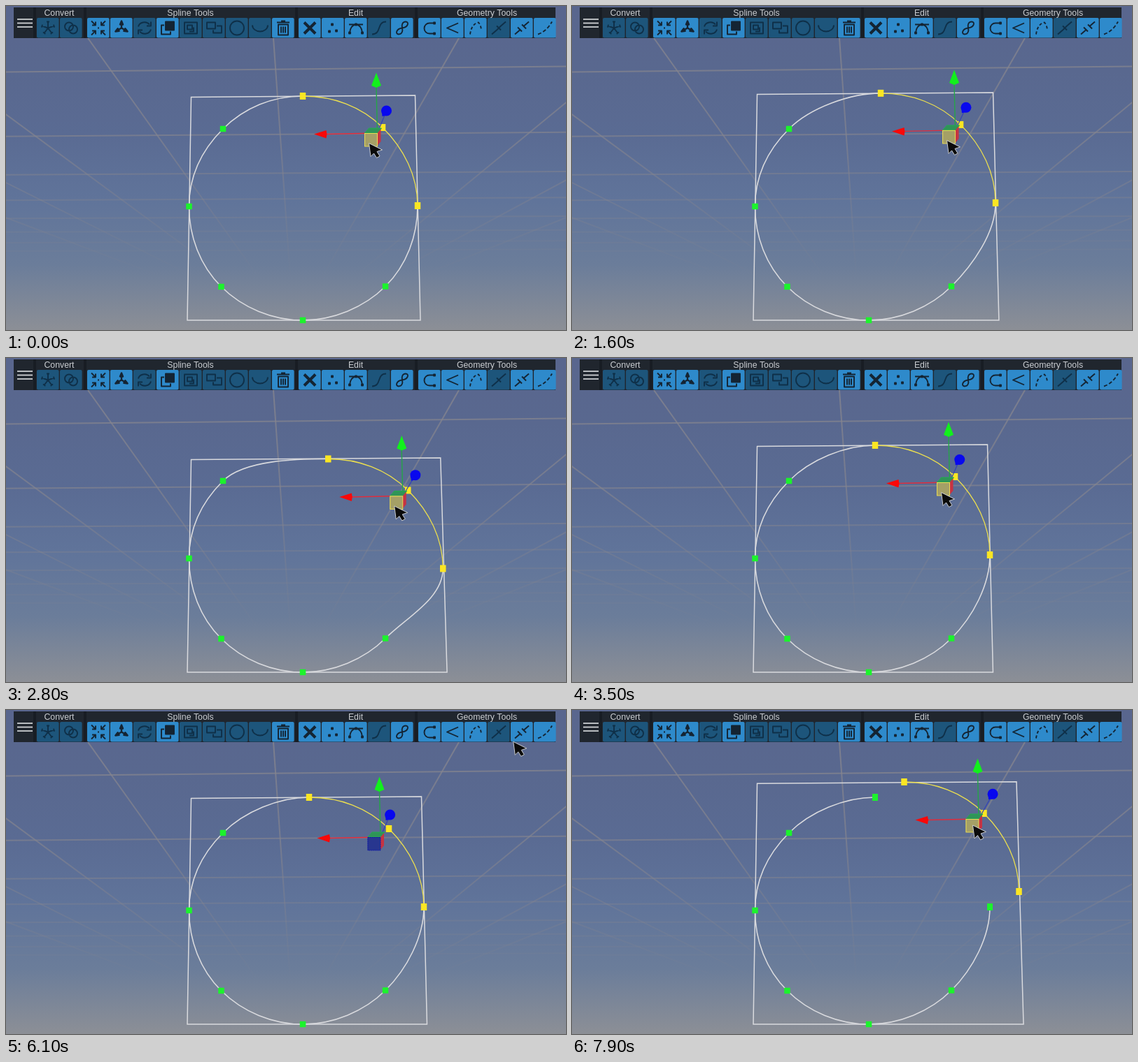
An HTML page with a canvas that plays this animation: 800 by 464 pixels, repeating every 8 s.

```html
<!DOCTYPE html>
<html>
<head>
<meta charset="utf-8">
<title>Spline editor</title>
<style>
html, body { margin: 0; width: 800px; height: 464px; overflow: hidden; }
canvas { display: block; }
</style>
</head>
<body>
<canvas id="stage" width="800" height="464"></canvas>
<script>
const ctx = document.getElementById('stage').getContext('2d');
const { PI, sin, cos, min, max } = Math;
const LOOP = 8000, STEP = 100;
const ORBIT_END = 3400, RELEASE = 4000, SPLIT = 6000, GRAB = 7000;
const FONT = 'px "Liberation Sans", Arial, sans-serif';

const add = (p, d) => [p[0] + d[0], p[1] + d[1]];
const mix = (a, b, k) => [a[0] + (b[0] - a[0]) * k, a[1] + (b[1] - a[1]) * k];
const progress = (t, from, to) => max(0, min(1, (t - from) / (to - from)));

// Drag offset: two loops around, a rest, then a fling out and part of the way back
const REST = [9, -4], FINAL = [50.5, -26];

function dragAt(t) {
  if (t >= SPLIT) {
    const v = progress(t, GRAB, 7700);
    return mix(REST, FINAL, v + 3.3 * sin(PI * v));
  }
  const u = progress(t, 0, ORBIT_END), c = cos(4 * PI * u), s = sin(4 * PI * u);
  return [REST[0] * u + 3.7 * (c - 1) - 30 * s + 17 * s * s,
    REST[1] * u + 16.3 * (1 - c) + 9.2 * s];
}

const GRIP = [518.5, 196.5], GRIP_AGAIN = [522, 191];
const SPLIT_BUTTON = [739, 32], WAITING = [625, 139];

function cursorAt(t, drag) {
  if (t < RELEASE) return add(GRIP, drag);
  if (t < SPLIT) return mix(add(GRIP, REST), SPLIT_BUTTON, sin(progress(t, RELEASE, 5100) * PI / 2));
  if (t <= 6800) return mix(SPLIT_BUTTON, WAITING, progress(t, SPLIT, 6800));
  if (t < GRAB) return mix(WAITING, add(GRIP_AGAIN, REST), progress(t, 6800, GRAB));
  return add(GRIP_AGAIN, drag);
}

function line(points, color, width = 1) {
  ctx.beginPath();
  points.forEach(p => ctx.lineTo(...p));
  ctx.strokeStyle = color;
  ctx.lineWidth = width;
  ctx.stroke();
}

function poly(points, fill, stroke, width = 1) {
  ctx.beginPath();
  points.forEach(p => ctx.lineTo(...p));
  ctx.closePath();
  ctx.fillStyle = fill;
  ctx.fill();
  if (stroke) {
    ctx.strokeStyle = stroke;
    ctx.lineWidth = width;
    ctx.stroke();
  }
}

function box(x, y, w, h, color) {
  ctx.fillStyle = color;
  ctx.fillRect(x, y, w, h);
}

function gradient(height, colors) {
  const g = ctx.createLinearGradient(0, 0, 0, height);
  colors.forEach((c, i) => g.addColorStop(i / (colors.length - 1), c));
  return g;
}

// Ground grid in perspective, seen against the sky
const sky = gradient(464, ['#59668e', '#59688f', '#5a6b93', '#60749a', '#6b7d9a', '#8c8f96']);
const haze = gradient(390, ['rgba(132,132,142,.85)', 'rgba(132,132,142,.65)', 'rgba(132,132,142,0)']);
const VANISH = [411, 459];

function backdrop() {
  box(0, 0, 800, 464, sky);
  for (let i = -4; i <= 4; i++) line([[382 + 265 * i, 46], VANISH], haze, 2);
  for (let i = 0; i < 8; i++) {
    const depth = 1075 / (i + 2.95);
    line([[0, VANISH[1] - depth], [800, VANISH[1] - 1.022 * depth]], haze, 2);
  }
}

// Icons are paths around the button's centre; turned() repeats one by rotation
const ring = (x, y, r) => `M${x - r} ${y}a${r} ${r} 0 1 1 ${2 * r} 0a${r} ${r} 0 1 1 ${-2 * r} 0`;
const rect = (x, y, w, h) => `M${x} ${y}h${w}v${h}h${-w}z`;
const knob = (x, y) => rect(x - 1, y - 1, 2, 2);

function turned(count, d) {
  const whole = new Path2D(), part = new Path2D(d);
  for (let i = 0; i < count; i++) whole.addPath(part, new DOMMatrix().rotate(360 / count * i));
  return whole;
}

const slash = 'M-10 9L-3 3M3-3L10-9';
const dim = (d, count = 1) => ({ path: turned(count, d), on: false, width: 1.9 });
const lit = (d, count = 1, width = 1.9) => ({ path: turned(count, d), on: true, width });

const groups = [
  ['Convert', 44, [dim('M0 0V-9M-2-9H2', 5), dim(ring(-3, -2, 6) + ring(3, 2, 6))]],
  ['Spline Tools', 116, [
    lit('M-10-10L-4-4M-9-4H-4V-9M-1 0H1', 4),
    lit('M0 0V-10L-2-5H2L0-10', 3, 2.4),
    dim('M-9-2A9 8 0 0 1 7-5M9-9V-3H3', 2),
    { ...lit(rect(-3, -9, 12, 12) + 'M-5-4H-9V9H4V5', 1), solid: rect(-3, -9, 12, 12) },
    dim(rect(-9, -8, 18, 16) + rect(-5, -4, 7, 6) + 'M4-1V5H-2'),
    dim(rect(-10, -8, 12, 9) + 'M4-3H11V7H-1V3'),
    dim(ring(0, 0, 10)),
    dim('M-11-4A11 9 0 0 0 11-4'),
    lit(rect(-7, -5, 14, 15) + 'M-9-8H9M-3-10H3M-3-2V7M0-2V7M3-2V7')]],
  ['Edit', 418, [
    lit('M0 0L8 8', 4, 4),
    lit(knob(-1, -5) + knob(-5, 5) + knob(5, 4)),
    lit('M-10-5H10M-9 7Q-8-4 0-5Q8-4 9 7' + knob(0, -5) + knob(-9, 7) + knob(9, 7)),
    dim('M-10 9C4 9-4-9 10-9'),
    lit('M0 0C9-1 10-9 5-9C0-9-1-4 0 0', 2)]],
  ['Geometry Tools', 589, [
    lit('M7-7H0A7 7 0 0 0 0 8H7' + knob(7, -7) + knob(7, 8)),
    lit('M8-7L-8 0L8 7'),
    { ...lit('M-8 9Q-6-6 4-8Q8-3 8 4'), dash: [4, 3] },
    dim(slash + 'M-3 3L3-3M-3-3L3 3'),
    lit(slash + 'M-6-1L0 5M0-5L6 1'),
    { ...lit('M-10 9Q2 5 10-9'), dash: [5, 3] }]]
];

function drawIcon({ path, solid, on, width, dash = [] }, x) {
  ctx.beginPath();
  ctx.roundRect(x, 17, 31.6, 28.6, 2);
  ctx.fillStyle = on ? '#2e8acb' : '#1d557b';
  ctx.fill();
  ctx.save();
  ctx.translate(x + 16, 31.5);
  ctx.strokeStyle = ctx.fillStyle = on ? '#142433' : '#0f3049';
  ctx.lineWidth = width;
  ctx.lineJoin = 'round';
  ctx.setLineDash(dash);
  if (solid) ctx.fill(new Path2D(solid));
  ctx.stroke(path);
  ctx.restore();
}

function label(text, x, y, size, color) {
  ctx.font = size + FONT;
  ctx.textAlign = 'center';
  ctx.fillStyle = color;
  ctx.fillText(text, x, y);
}

function toolbar() {
  box(11, 2, 774, 44, '#20262e');
  for (const y of [19, 24.5, 30]) line([[16, y], [38, y]], '#dfe2e5', 1.6);
  for (const [title, left, icons] of groups) {
    box(left - 5, 2, 4, 44, '#181d24');
    label(title, left + icons.length * 16.5 - 1, 14, 12.3, '#c9ccd0');
    icons.forEach((icon, i) => drawIcon(icon, left + i * 33));
  }
}

// Eight knots clockwise from the top, each with a tangent handle 45 degrees further round
const knots = [[424, 129], [538, 174], [588, 286], [542, 401.5],
  [424, 450], [307.5, 402], [261.5, 287], [310, 176]]
  .map((p, i) => [p, [43 * cos(i * PI / 4), 43 * sin(i * PI / 4)]]);
const arc = knots.slice(0, 3), fixed = knots.slice(3);

const moved = (list, d) => list.map(([p, h]) => [add(p, d), h]);
const dot = ([x, y], w, h, color) => box(x - w / 2, y - h / 2, w, h, color);

function spline(list, color, width) {
  ctx.beginPath();
  ctx.moveTo(...list[0][0]);
  for (let i = 1; i < list.length; i++) {
    const [p, h] = list[i - 1], [q, g] = list[i];
    ctx.bezierCurveTo(...add(p, h), q[0] - g[0], q[1] - g[1], ...q);
  }
  ctx.strokeStyle = color;
  ctx.lineWidth = width;
  ctx.stroke();
}

function shape(t, drag) {
  const [dx, dy] = drag;
  const picked = moved(arc, drag);
  const ends = moved(arc, t < SPLIT ? drag : REST);
  poly([[264.5, 130.5 + dy * .97], [584.5 + dx, 128 + dy * .97], [592 + dx * 1.05, 450], [259, 450]],
    'transparent', '#d9dade', 1.5);
  spline([ends[2], ...fixed, ends[0]], '#d9dade', 1.6);
  spline(picked, '#ecdf4e', 1.3);
  for (const [p] of fixed) dot(p, 8.5, 8.5, '#1cf32c');
  if (t >= GRAB) for (const i of [0, 2]) dot(ends[i][0], 8, 10, '#1cf32c');
  for (const [p] of picked) dot(p, 8.5, 10, '#fbe623');
}

// Move gizmo: axes, cones and the plane handle, drawn around its origin
function gizmo([dx, dy], active) {
  const depthTip = [13 + dx * .14, -32 + dy * .14];
  ctx.save();
  ctx.translate(530.5 + dx, 182 + dy);
  line([[0, 0], depthTip], '#3342b8', 1.2);
  line([[-1.5, -66], [0, 0]], '#25a548', 1.4);
  line([[-73, 1.5], [0, 0]], '#e02c3c', 1.3);
  poly([[-18, 0], [-12, -7], [6, -7], [0, 0]], '#2f9458', '#22ad50');
  poly([[0, 0], [5, -6], [5, 12], [0, 18]], '#c63342');
  box(-18.5, 0, 18.5, 19, active ? '#a5a066' : '#28368f');
  ctx.setLineDash(active ? [] : [2, 1]);
  ctx.strokeStyle = active ? '#e8da55' : '#1018a8';
  ctx.lineWidth = 1;
  ctx.strokeRect(-18, .5, 18, 18.5);
  ctx.setLineDash([]);
  poly([[-1.5, -86.5], [5.5, -68], [-1.5, -65], [-8.5, -68]], '#12f01c');
  poly([[-90.5, 1.5], [-73, -4], [-72, 1.5], [-73, 7.5]], '#fa0808');
  ctx.translate(...depthTip);
  ctx.beginPath();
  ctx.arc(0, 0, 7.5, 0, 2 * PI);
  ctx.fillStyle = '#0808ee';
  ctx.fill();
  poly([[-7, -2], [-6, 8], [4, 6]], '#0808ee');
  ctx.restore();
}

function pointer(tip) {
  const arrow = [[0, 0], [19, 9.5], [11.5, 12], [15.5, 18.5], [11, 21], [7, 14.5], [2.5, 19]];
  poly(arrow.map(p => add(p, tip)), '#0b0b0b', '#c9ccd0');
}

function draw(t) {
  const drag = dragAt(t), recentred = t >= SPLIT && t < GRAB;
  backdrop();
  shape(t, drag);
  gizmo(recentred ? [4.5, 0] : drag, t < RELEASE || t >= GRAB);
  toolbar();
  if (t < SPLIT) label('Split', 760, 24, 15.3, `rgba(200,205,212,${progress(t, 4900, 5400)})`);
  pointer(cursorAt(t, drag));
}

function tick() {
  const t = performance.now() % LOOP;
  draw(Math.floor(t / STEP) * STEP);
  requestAnimationFrame(tick);
}
tick();
</script>
</body>
</html>
```
